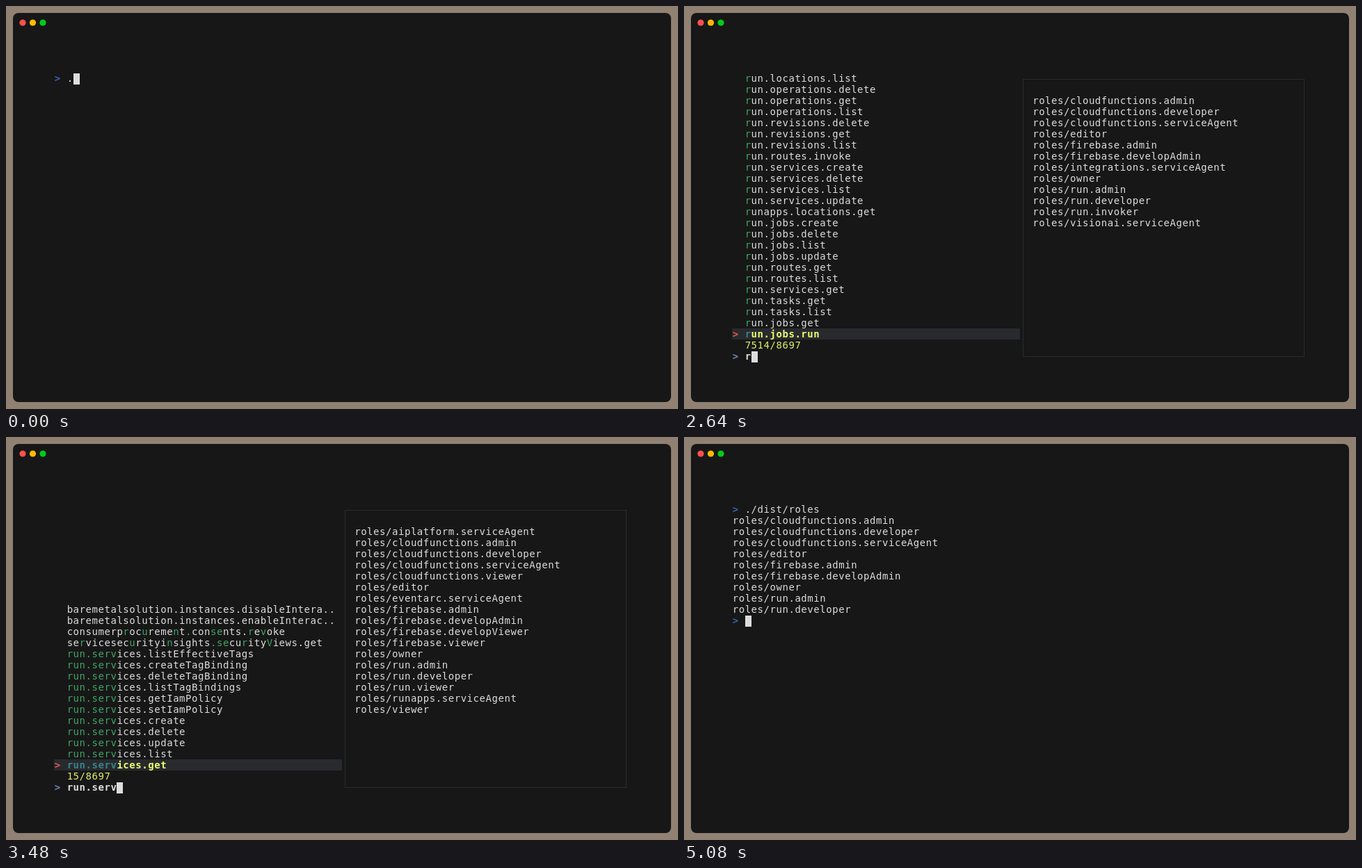
An HTML page with a canvas for the animation above (8.04 s loop, 966 by 580 pixels).

```html
<!DOCTYPE html>
<html lang="en">
<head>
<meta charset="utf-8">
<title>Terminal role finder</title>
<style>
  html, body { margin: 0; width: 966px; height: 580px; overflow: hidden; background: #908172; }
  canvas { display: block; }
</style>
</head>
<body>
<canvas id="stage" width="966" height="580"></canvas>
<script>
const ctx = document.getElementById('stage').getContext('2d');
const LOOP = 8040, TICK = 40;
const LEFT = 69.7, TOP = 97, CELL = 8.97, LINE = 16;
const LIST_ROWS = 24, LIST_WIDTH = 43;
const COLOR = {
  text: '#dddddd', shell: '#3a61ad', prompt: '#6d83b8', pointer: '#e0574c',
  match: '#3fa568', activeMatch: '#37858a', active: '#ebff71', count: '#dcee68', row: '#282a2e'
};

const words = text => text.trim().split(/\s+/);
const prefixed = (prefix, text) => words(text).map(word => prefix + word);
const roles = text => prefixed('roles/', text);

// Lists run from the top row down to the selected row.
const allPermissions = [
  ...prefixed('accesscontextmanager.access', `Zones.delete Zones.create Policies.update
    Policies.setIamPolicy Policies.list Policies.getIamPolicy Policies.get Policies.delete
    Policies.create Levels.update Levels.replaceAll Levels.list Levels.get Levels.delete Levels.create`),
  ...prefixed('accessapproval.', `settings.update settings.get settings.delete serviceAccounts.get
    requests.list requests.invalidate requests.get requests.dismiss requests.approve`)
];
const firstMatches = prefixed('run', `.locations.list .operations.delete .operations.get
  .operations.list .revisions.delete .revisions.get .revisions.list .routes.invoke
  .services.create .services.delete .services.list .services.update apps.locations.get
  .jobs.create .jobs.delete .jobs.list .jobs.update .routes.get .routes.list .services.get
  .tasks.get .tasks.list .jobs.get .jobs.run`);
const runMatches = prefixed('run.', `revisions.delete executions.list operations.list
  services.create services.delete services.update executions.get locations.list operations.get
  revisions.list revisions.get routes.invoke services.list services.get jobs.create jobs.delete
  jobs.update routes.list routes.get tasks.list jobs.list tasks.get jobs.get jobs.run`);
const serviceMatches = [
  ...prefixed('baremetalsolution.instances.',
    'disableInteractiveSerialConsole enableInteractiveSerialConsole'),
  'consumerprocurement.consents.revoke',
  'servicesecurityinsights.securityViews.get',
  ...runMatches.filter(name => !name.includes('services')),
  ...prefixed('run.services.', `listEffectiveTags createTagBinding deleteTagBinding
    listTagBindings getIamPolicy setIamPolicy create delete update list get`)
];

const createRoles = roles(`cloudfunctions.admin cloudfunctions.developer cloudfunctions.serviceAgent
  editor firebase.admin firebase.developAdmin owner run.admin run.developer`);
const previews = {
  'accessapproval.requests.approve': roles('accessapproval.approver owner'),
  'run.jobs.run': roles(`cloudfunctions.admin cloudfunctions.developer cloudfunctions.serviceAgent
    editor firebase.admin firebase.developAdmin integrations.serviceAgent owner run.admin
    run.developer run.invoker visionai.serviceAgent`),
  'run.services.get': roles(`aiplatform.serviceAgent cloudfunctions.admin cloudfunctions.developer
    cloudfunctions.serviceAgent cloudfunctions.viewer editor eventarc.serviceAgent firebase.admin
    firebase.developAdmin firebase.developViewer firebase.viewer owner run.admin run.developer
    run.viewer runapps.serviceAgent viewer`),
  'run.services.create': createRoles
};
const counts = { '': 8697, r: 7514, ru: 4126, run: 2318, 'run.': 1243, 'run.s': 684, 'run.se': 391 };

const COMMAND = './dist/roles';
const typing = [
  [2640, 40, 'run'], [3280, 50, '.services'], [4200, 50, '.'], [4280, 48, 'create']
];

function typed(t, start, step, text) {
  return text.slice(0, Math.max(0, Math.floor((t - start) / step) + 1));
}

// Fuzzy match: find the earliest end going forward, then tighten going back.
function findMatch(name, query) {
  const lower = name.toLowerCase();
  let end = -1;
  for (const char of query) {
    end = lower.indexOf(char, end + 1);
    if (end < 0) return null;
  }
  const hits = new Set();
  for (const char of [...query].reverse()) {
    end = lower.lastIndexOf(char, end);
    hits.add(end--);
  }
  return hits;
}

function candidates(query) {
  if (!query) return allPermissions;
  if (query === 'r') return firstMatches;
  return query.length < 5 ? runMatches : serviceMatches;
}

function write(col, row, text, color = COLOR.text, bold = false) {
  ctx.font = `${bold ? 'bold ' : ''}14px "DejaVu Sans Mono", monospace`;
  [...text].forEach((char, i) => {
    ctx.fillStyle = typeof color === 'function' ? color(i) : color;
    ctx.fillText(char, LEFT + (col + i) * CELL, TOP + row * LINE + 12);
  });
}

function cursor(col, row) {
  ctx.fillStyle = COLOR.text;
  ctx.fillRect(Math.round(LEFT + col * CELL), TOP + row * LINE, 9, LINE);
}

function drawWindow() {
  ctx.fillStyle = '#908172';
  ctx.fillRect(0, 0, 966, 580);
  ctx.fillStyle = '#171717';
  ctx.beginPath();
  ctx.roundRect(10, 10, 946, 560, 8);
  ctx.fill();
  ['#ff4f4d', '#febb00', '#00cc1d'].forEach((color, i) => {
    ctx.fillStyle = color;
    ctx.beginPath();
    ctx.arc(24 + i * 14.5, 24, 4.6, 0, Math.PI * 2);
    ctx.fill();
  });
}

function drawShell(command, output, showCursor) {
  write(0, 0, '>', COLOR.shell, true);
  write(2, 0, command);
  output.forEach((line, i) => write(0, i + 1, line));
  const row = output.length && output.length + 1;
  if (row) write(0, row, '>', COLOR.shell, true);
  if (showCursor) cursor(row ? 2 : 2 + command.length, row);
}

function drawFinder(query, showCursor) {
  const found = candidates(query).filter(name => findMatch(name, query));
  const rows = found.slice(-LIST_ROWS);
  const last = LIST_ROWS - 1;

  ctx.fillStyle = COLOR.row;
  ctx.fillRect(69, TOP + last * LINE - 1, 414, LINE);
  write(0, last, '>', COLOR.pointer, true);

  rows.forEach((name, i) => {
    const row = LIST_ROWS - rows.length + i;
    const active = row === last;
    const cut = name.length > LIST_WIDTH;
    const hits = cut ? new Set() : findMatch(name, query);
    const base = active ? COLOR.active : COLOR.text;
    const match = active ? COLOR.activeMatch : COLOR.match;
    const label = cut ? name.slice(0, LIST_WIDTH - 2) + '..' : name;
    write(2, row, label, k => hits.has(k) ? match : base, active);
  });

  write(2, LIST_ROWS, `${counts[query] ?? found.length}/8697`, COLOR.count);
  write(0, LIST_ROWS + 1, '>', COLOR.prompt, true);
  write(2, LIST_ROWS + 1, query, COLOR.text, true);
  if (showCursor) cursor(2 + query.length, LIST_ROWS + 1);

  ctx.strokeStyle = COLOR.row;
  ctx.lineWidth = 1;
  ctx.strokeRect(487.5, 105.5, 404, 399);
  previews[rows[rows.length - 1]].forEach((role, i) => write(48.1, i + 2, role));
}

function draw(now) {
  const t = Math.floor((now % LOOP) / TICK) * TICK;
  drawWindow();
  if (t < 1640) {
    drawShell('.' + typed(t, 80, 52, COMMAND.slice(1)), [], t < 1160);
  } else if (t < 5080) {
    const query = typing.map(part => typed(t, ...part)).join('');
    drawFinder(query, t < 2240 || t >= 2640);
  } else {
    drawShell(COMMAND, createRoles, true);
  }
}

const start = performance.now();
function frame() {
  draw(performance.now() - start);
  requestAnimationFrame(frame);
}
frame();
</script>
</body>
</html>
```
